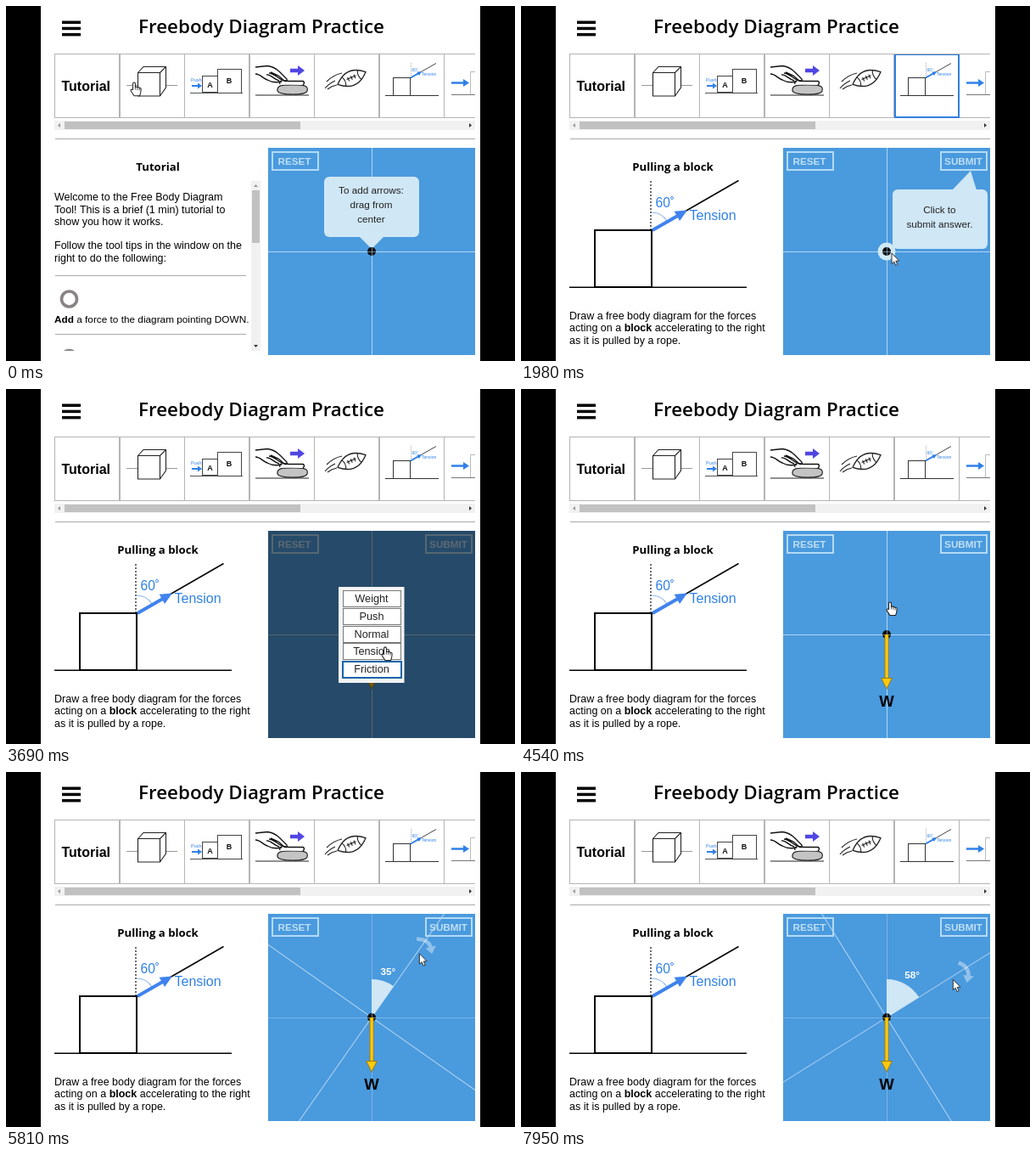
Recreate the animation shown at these times as an HTML page with a canvas. Size 600 by 418 pixels, loop 8 s.

```html
<!DOCTYPE html>
<html lang="en">
<head>
<meta charset="utf-8">
<title>Freebody Diagram Practice</title>
<style>
html, body { margin: 0; width: 100%; height: 100%; overflow: hidden; background: #000; }
canvas { display: block; }
</style>
</head>
<body>
<canvas id="stage" width="600" height="418"></canvas>
<script>
const g = document.getElementById('stage').getContext('2d');
const LOOP = 8000;
const SANS = '"Liberation Sans", Arial, sans-serif';
const HEAD = '"Open Sans", "Noto Sans", sans-serif';
const BLUE = '#2f80e8', PANEL = '#4a9ade', PALE = '#d0e7f6', GREY = '#b4b4b4';
const CX = 431, CY = 289;
const RAD = Math.PI / 180;

function rect(x, y, w, h, fill) { g.fillStyle = fill; g.fillRect(x, y, w, h); }

function frame(x, y, w, h, color, width = 1) {
  g.strokeStyle = color; g.lineWidth = width; g.strokeRect(x, y, w, h);
}

function line(color, width, ...p) {
  g.strokeStyle = color; g.lineWidth = width;
  g.beginPath();
  g.moveTo(p[0], p[1]);
  for (let i = 2; i < p.length; i += 2) g.lineTo(p[i], p[i + 1]);
  g.stroke();
}

function poly(fill, ...p) {
  g.beginPath();
  for (let i = 0; i < p.length; i += 2) g.lineTo(p[i], p[i + 1]);
  g.closePath();
  g.fillStyle = fill;
  g.fill();
}

function ring(x, y, r, color, width) {
  g.strokeStyle = color; g.lineWidth = width;
  g.beginPath(); g.arc(x, y, r, 0, 7); g.stroke();
}

function disc(x, y, r, color) {
  g.fillStyle = color;
  g.beginPath(); g.arc(x, y, r, 0, 7); g.fill();
}

function text(s, x, y, size, color = '#000', align = 'left', weight = 400, family = SANS) {
  g.font = `${weight} ${size}px ${family}`;
  g.fillStyle = color; g.textAlign = align;
  g.fillText(s, x, y);
}

function path(d, stroke, width, fill) {
  const p = new Path2D(d);
  if (fill) { g.fillStyle = fill; g.fill(p); }
  g.strokeStyle = stroke; g.lineWidth = width; g.stroke(p);
}

// Arrow with a triangular head ending at (x2, y2)
function arrow(x1, y1, x2, y2, width, head, half, color) {
  const len = Math.hypot(x2 - x1, y2 - y1), a = Math.atan2(y2 - y1, x2 - x1);
  g.save();
  g.translate(x1, y1); g.rotate(a);
  line(color, width, 0, 0, len - head + 1, 0);
  poly(color, len - head, -half, len, 0, len - head, half);
  g.restore();
}

// Linear interpolation through [time, ...values] keys
function track(t, keys) {
  if (t <= keys[0][0]) return keys[0].slice(1);
  for (let i = 1; i < keys.length; i++) {
    const a = keys[i - 1], b = keys[i];
    if (t < b[0]) {
      const k = (t - a[0]) / (b[0] - a[0]);
      return a.slice(1).map((v, j) => v + (b[j + 1] - v) * k);
    }
  }
  return keys[keys.length - 1].slice(1);
}

const mouseKeys = [
  [0, 151, 90], [89, 151, 90], [90, 182, 83], [290, 190, 80], [350, 270, 65], [410, 359, 84],
  [610, 362, 85], [790, 467, 86], [1480, 467, 86], [1560, 472, 200], [1630, 449, 302],
  [1830, 447, 300], [1980, 437, 291], [2240, 434, 293], [2910, 433, 347],
  [3309, 433, 347], [3310, 433, 338], [3540, 440, 333], [3690, 447, 304], [4120, 437, 250],
  [4480, 436, 249], [4540, 435, 251], [5190, 434, 195]
];
const angleKeys = [
  [5420, 0], [5810, 35], [6200, 49], [6380, 52], [6440, 53], [6640, 53],
  [7370, 60], [7530, 60], [7620, 58]
];
const reachKeys = [[5420, 94], [5810, 94], [6380, 88], [7620, 90]];

const angleAt = t => track(t, angleKeys)[0];

function polar(deg, r) {
  return [CX + r * Math.sin(deg * RAD), CY - r * Math.cos(deg * RAD)];
}

function mouseAt(t) {
  if (t < 5420) return track(t, mouseKeys);
  const [x, y] = polar(angleAt(t) + 1.8, track(t, reachKeys)[0]);
  return t < 7950 ? [x, y] : [x + .5, y + .5];
}

function thumbs(t) {
  g.save();
  g.beginPath(); g.rect(57, 55, 496, 78); g.clip();
  for (let i = 0; i < 7; i++) frame(57.5 + Math.round(i * 76.5), 56.5, 76, 75, GREY);
  text('Tutorial', 65.5, 100, 16, '#000', 'left', 700);

  line('#999', 1, 142, 93.5, 202, 93.5);
  path('M155.5 78.5 L162 71.5 L188.5 71.5 L188.5 96 L181.5 106 L155.5 106 Z', '#222', 1.1, '#fff');
  path('M155.5 78.5 L181.5 78.5 L181.5 106 M181.5 78.5 L188.5 71.5', '#222', 1.1);

  line('#555', 1, 217, 102.5, 279, 102.5);
  frame(231.5, 82.5, 18, 19, '#444');
  frame(249.5, 74.5, 28, 28, '#444');
  text('A', 240.5, 96, 9, '#111', 'center', 700);
  text('B', 263, 91, 9, '#111', 'center', 700);
  text('Push', 218, 89, 5.5, BLUE);
  arrow(219, 94, 231, 94, 2, 5, 3.5, BLUE);

  line('#222', 1.2, 294, 105, 357, 105);
  path('M320 100 C319 93 326 93 337 93 C350 93 357 93 355 100 C353 105.5 323 105.5 320 100 Z', '#222', 1.2, '#c4c4c4');
  path('M323 92 C321 87 327 87 333 88.5 L350 88.5 Q353 90 350 93', '#111', 1.4, '#fff');
  path('M294 72 L308 70.5 C314 71 318 73 323 78 L331 86 Q332 90 328 88 L321 82 L312 78 M294 80 C300 80 302 85 308 87 C313 90 320 90 325 89 M307 81 C312 80 315 86 322 88 M310 79 C315 79 318 83 325 87', '#111', 1.4);
  arrow(335, 76, 352, 76, 4.5, 8, 6, '#5046e4');

  g.save();
  g.translate(407.5, 85); g.rotate(-.42);
  path('M-18 0 Q0 -17 18 0 Q0 17 -18 0 Z', '#222', 1.3, '#fff');
  path('M-10 -6 Q-7 0 -10 6 M10 -6 Q7 0 10 6 M-6 -1 L6 -1 M-4 -3 V2 M0 -3 V2 M4 -3 V2', '#222', 1.1);
  g.restore();
  path('M378 89 Q386 81 396 79 M376 97 Q381 91 388 88 M379 98 Q384 94 390 93', '#222', 1.1);

  line('#333', 1, 447, 105.5, 510, 105.5);
  frame(456.5, 84.5, 20, 21, '#333');
  line('#444', 1, 477, 84.5, 507, 67.5);
  g.setLineDash([1, 1]); line('#aaa', 1, 477.5, 67, 477.5, 84); g.setLineDash([]);
  arrow(477, 84.5, 490, 77.2, 1.8, 5, 2.6, BLUE);
  text('60°', 478.5, 77, 5, BLUE);
  text('Tension', 490, 82, 5, BLUE);

  arrow(525, 90.5, 546, 90.5, 2.5, 7, 4.5, BLUE);
  line('#777', 1, 525, 104.5, 553, 104.5);
  line('#bbb', 1, 553, 77.5, 547.5, 77.5, 547.5, 104);

  if (t >= 1220 && t < 2240) frame(441, 57, 75, 74, '#2f7fe0', 2);
  g.restore();
  line(GREY, 1, 57, 56.5, 553, 56.5);
}

function chrome(t) {
  rect(0, 0, 600, 418, '#000');
  rect(41, 0, 518, 418, '#fff');
  for (let i = 0; i < 3; i++) rect(66, 17.5 + i * 7.2, 22, 3.5, '#000');
  text('Freebody Diagram Practice', 301, 32, 22.4, '#000', 'center', 600, HEAD);
  thumbs(t);
  rect(57, 135, 496, 11, '#f1f1f1');
  rect(69, 136, 278, 9, '#c1c1c1');
  poly('#999', 61, 140.5, 64, 138, 64, 143);
  poly('#333', 549, 140.5, 546, 138, 546, 143);
  rect(58, 156, 495, 1, '#aaa');
}

function paragraph(lines, y) {
  lines.forEach((s, i) => text(s, 57, y + i * 14.5, 12.5));
}

// Draws alternating regular and bold runs on one line
function mixed(x, y, size, ...runs) {
  runs.forEach((s, i) => {
    text(s, x, y, size, '#000', 'left', i % 2 ? 700 : 400);
    x += g.measureText(s).width;
  });
}

function heading(s) { text(s, 179, 194, 13.2, '#000', 'center', 700, HEAD); }

function tutorial() {
  heading('Tutorial');
  paragraph(['Welcome to the Free Body Diagram', 'Tool! This is a brief (1 min) tutorial to', 'show you how it works.'], 229);
  paragraph(['Follow the tool tips in the window on the', 'right to do the following:'], 286);
  rect(58, 317, 225, 1, '#aaa');
  ring(74.5, 345, 9, '#8a8484', 3.6);
  rect(58, 386, 225, 1, '#aaa');
  g.save();
  g.beginPath(); g.rect(57, 390, 230, 16); g.clip();
  ring(74.5, 414.5, 9, '#8a8484', 3.6);
  g.restore();
  rect(289, 206, 11, 200, '#f1f1f1');
  rect(290, 217, 9, 62, '#c1c1c1');
  poly('#999', 294.5, 210, 292, 213, 297, 213);
  poly('#333', 294.5, 402, 292, 399, 297, 399);
  mixed(57, 373, 11.8, '', 'Add', ' a force to the diagram pointing DOWN.');
}

function problem(withFigure) {
  heading('Pulling a block');
  paragraph(['Draw a free body diagram for the forces'], 368.5);
  mixed(57, 383, 12.5, 'acting on a ', 'block', ' accelerating to the right');
  paragraph(['as it is pulled by a rope.'], 397.5);
  if (!withFigure) return;
  line('#000', 1.4, 57, 331.3, 266, 331.3);
  frame(87, 264, 67, 67, '#000', 2);
  g.setLineDash([2, 2]); line('#222', 1.3, 153, 206, 153, 264); g.setLineDash([]);
  line('#000', 1.5, 154, 264.5, 256.5, 205.5);
  g.strokeStyle = '#8fbaf0'; g.lineWidth = 1.2;
  g.beginPath(); g.arc(154, 264, 21, -90 * RAD, -30 * RAD); g.stroke();
  arrow(155, 264, 196, 240.5, 4, 14, 6.5, '#4083ee');
  text('60˚', 158.5, 237, 15.6, BLUE);
  text('Tension', 198.5, 252, 16, BLUE);
}

function button(label, x, w, cx) {
  frame(x, 172, w, 21, '#b3daf5', 2);
  text(label, cx, 187, 11.7, '#c0e0f7', 'center', 700);
}

function tip(x, y, w, h, pointer, lines, baseline) {
  g.fillStyle = PALE;
  g.beginPath(); g.roundRect(x, y, w, h, 6); g.fill();
  poly(PALE, ...pointer);
  lines.forEach((s, i) => text(s, x + w / 2 - .6, baseline + i * 17.4, 11.7, '#222', 'center'));
}

function forceArrow(len) {
  if (len < 8) return;
  const y = CY + len;
  rect(CX - 2.5, CY, 5, len - 11, '#9a7c10');
  rect(CX - 1.5, CY, 3.2, len - 10, '#ffc90e');
  poly('#9a7c10', CX - 7, y - 13, CX + 7, y - 13, CX, y + 1);
  poly('#ffc90e', CX - 5.5, y - 12, CX + 5.5, y - 12, CX, y - 1);
}

function rotator(angle) {
  const [x, y] = polar(angle + 1.3, 107);
  g.save();
  g.translate(x, y); g.rotate(angle * RAD);
  path('M-12 1 Q-2 -7 7 -1', 'rgba(255,255,255,.4)', 4.5);
  poly('rgba(255,255,255,.4)', 3, 4, 11, -6, 13, 5);
  g.restore();
}

function turnedAxes(angle) {
  g.save();
  g.translate(CX, CY); g.rotate(angle * RAD);
  line('#b3d6f1', 1, -250, 0, 250, 0);
  line('#b3d6f1', 1, 0, -250, 0, 250);
  g.restore();
  g.fillStyle = PALE;
  g.beginPath(); g.moveTo(CX, CY);
  g.arc(CX, CY, 45, -Math.PI / 2, (angle - 90) * RAD);
  g.fill();
  const [x, y] = polar(angle / 2, 58);
  text(Math.round(angle) + '°', x + 2, y + 5, 11.7, '#fff', 'center', 700);
}

function menu(t) {
  rect(309, 167, 244, 244, 'rgba(10,10,10,.55)');
  rect(392, 233, 77.5, 113, '#f4f4f4');
  const hover = Math.floor((mouseAt(t - 90)[1] - 237) / 20.8);
  ['Weight', 'Push', 'Normal', 'Tension', 'Friction'].forEach((s, i) => {
    const y = 237 + Math.round(i * 20.8);
    rect(397, y, 69, 20, '#fff');
    if (i === hover) frame(397, y + 1, 69, 19, '#1464a8', 2);
    else frame(397.5, y + .5, 68, 19, '#777');
    text(s, CX, y + 14, 12.7, '#222', 'center');
  });
}

function diagram(t) {
  g.save();
  g.beginPath(); g.rect(309, 167, 244, 244); g.clip();
  rect(309, 167, 244, 244, PANEL);
  const angle = angleAt(t), turning = t >= 5420;
  const axis = turning ? '#78b3e5' : '#b0d5f1';
  rect(CX, 167, 1, 244, axis);
  rect(309, CY, 244, 1, axis);
  if (turning) turnedAxes(angle);
  button('RESET', 314, 54, 340);
  if (t >= 1220) button('SUBMIT', 495, 54, 521.5);
  if (t >= 5100) rotator(angle);

  if (t < 1220) {
    tip(375, 201, 112, 71, [416, 271, 446, 271, 431, 286],
      ['To add arrows:', 'drag from', 'center'], 220.5);
  } else if (t < 2240) {
    tip(438, 216, 112, 70, [508, 217, 530, 194, 537, 217],
      ['Click to', 'submit answer.'], 243.5);
  }

  if (t >= 1830 && t < 3310) disc(CX, CY, 10.5, '#cfe8f3');
  disc(CX, CY, 5, '#0a0a0a');
  rect(CX, CY - 5, 1, 10, 'rgba(176,213,241,.6)');
  rect(CX - 5, CY, 10, 1, 'rgba(176,213,241,.6)');
  if (t >= 2240) forceArrow(track(t, [[2240, 4], [2910, 64]])[0]);
  if (t >= 4480) text('W', CX, 373.5, 18.5, '#000', 'center', 700);
  if (t >= 3310 && t < 4480) menu(t);
  g.restore();
}

function cursor(t) {
  const [x, y] = mouseAt(t);
  const hand = t < 1500 || (t >= 3310 && t < 5190);
  g.save();
  g.translate(x, y);
  g.lineJoin = 'round';
  if (hand) {
    g.scale(.95, .95);
    path('M-1.5 9 L-1.5 1 Q0 -1 1.5 1 L1.5 6 Q3 4.5 4 6.2 Q5.7 5 6.5 7 Q8.6 6.4 8.6 8.5 L8.2 12 L7 16.5 L0 16.5 L-4 10.5 Q-4.5 8 -2.5 8.7 Z', '#222', 1.1, '#fff');
    path('M1.5 6 V9 M4 6.5 V9.5 M6.4 7 V10', '#222', .8);
  } else {
    path('M0 0 L0 12.5 L2.8 10 L4.8 14.4 L6.8 13.5 L4.9 9.2 L8.7 9 Z', '#333', 1, '#fff');
  }
  g.restore();
}

const start = performance.now();

function draw(now) {
  const t = Math.max(0, now - start) % LOOP;
  chrome(t);
  if (t < 1280) tutorial();
  else problem(t >= 1480);
  diagram(t);
  cursor(t);
  requestAnimationFrame(draw);
}
draw(start);
</script>
</body>
</html>
```
